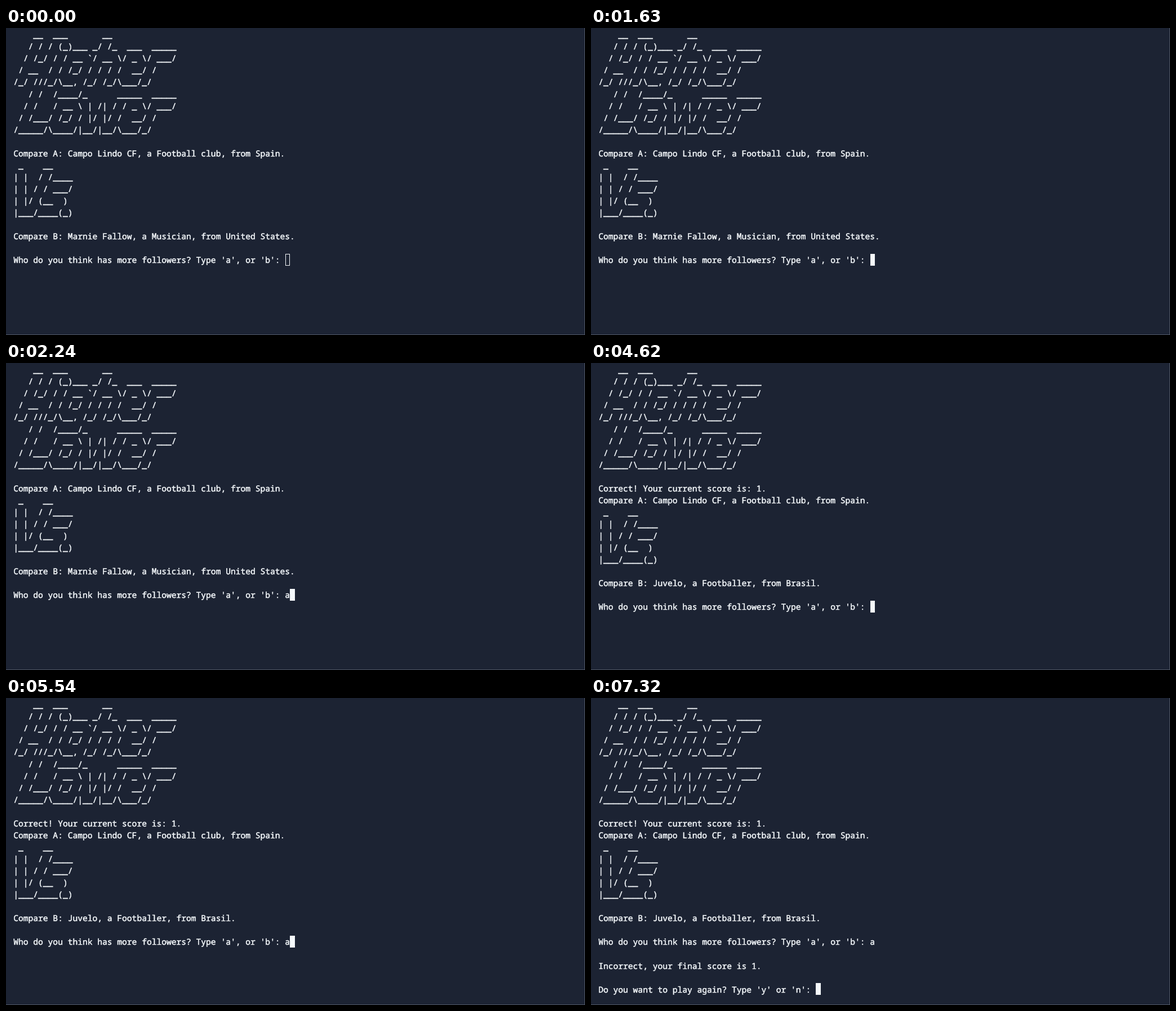
An HTML page for the animation above (8000 ms loop, 1028x545 px).

```html
<!DOCTYPE html>
<html lang="en">
<head>
<meta charset="utf-8">
<title>Higher Lower</title>
<style>
  html, body { margin: 0; width: 100%; height: 100%; overflow: hidden; background: #1c2333; }
  body { position: relative; }
  pre {
    position: absolute; left: 13.25px; top: 2.2px; margin: 0;
    color: #f5f9fc;
    font: 500 14.62px/21.07px "Noto Sans Mono", "DejaVu Sans Mono", monospace;
    -webkit-text-stroke: .5px #f5f9fc;
    font-variant-ligatures: none;
    text-rendering: geometricPrecision;
  }
  #cursor {
    position: absolute; box-sizing: border-box;
    width: 8.77px; height: 21.07px;
    border: 1px solid #f5f9fc;
  }
  #cursor.solid { background: #f5f9fc; }
  #edge {
    position: absolute; inset: 0;
    border: solid #505665; border-width: 0 1px 1px 0;
  }
</style>
</head>
<body>
<pre>
    __  ___       __
   / / / (_)___ _/ /_  ___  _____
  / /_/ / / __ `/ __ \/ _ \/ ___/
 / __  / / /_/ / / / /  __/ /
/_/ ///_/\__, /_/ /_/\___/_/
   / /  /____/_      _____  _____
  / /   / __ \ | /| / / _ \/ ___/
 / /___/ /_/ / |/ |/ /  __/ /
/_____/\____/|__/|__/\___/_/

<span id="game"></span></pre>
<div id="cursor"></div>
<div id="edge"></div>
<script>
const LEFT = 13.25, TOP = .7, CELL = 8.77, LINE = 21.07, FIRST_ROW = 10, LOOP = 8000;
const game = document.getElementById('game');
const cursor = document.getElementById('cursor');

const round = rival => `Compare A: Campo Lindo CF, a Football club, from Spain.
 _    __
| |  / /____
| | / / ___/
| |/ (__  )
|___/____(_)

Compare B: ${rival}.

Who do you think has more followers? Type 'a', or 'b': `;

const first = round('Marnie Fallow, a Musician, from United States');
const second = 'Correct! Your current score is: 1.\n' + round('Juvelo, a Footballer, from Brasil');
const ending = "a\n\nIncorrect, your final score is 1.\n\nDo you want to play again? Type 'y' or 'n': ";

// [start in ms, text after the title]
const steps = [
  [0, first],
  [2240, first + 'a'],
  [3230, second],
  [5540, second + 'a'],
  [6290, second + ending]
];
const FOCUS_AT = 710;

let shown;
function draw(now) {
  const t = now % LOOP;
  const text = steps.findLast(([start]) => t >= start)[1];
  if (text !== shown) {
    const lines = text.split('\n');
    game.textContent = shown = text;
    cursor.style.left = LEFT + lines.at(-1).length * CELL + 'px';
    cursor.style.top = TOP + (FIRST_ROW + lines.length - 1) * LINE + 'px';
  }
  cursor.className = t >= FOCUS_AT ? 'solid' : '';
  requestAnimationFrame(draw);
}
requestAnimationFrame(draw);
</script>
</body>
</html>
```
